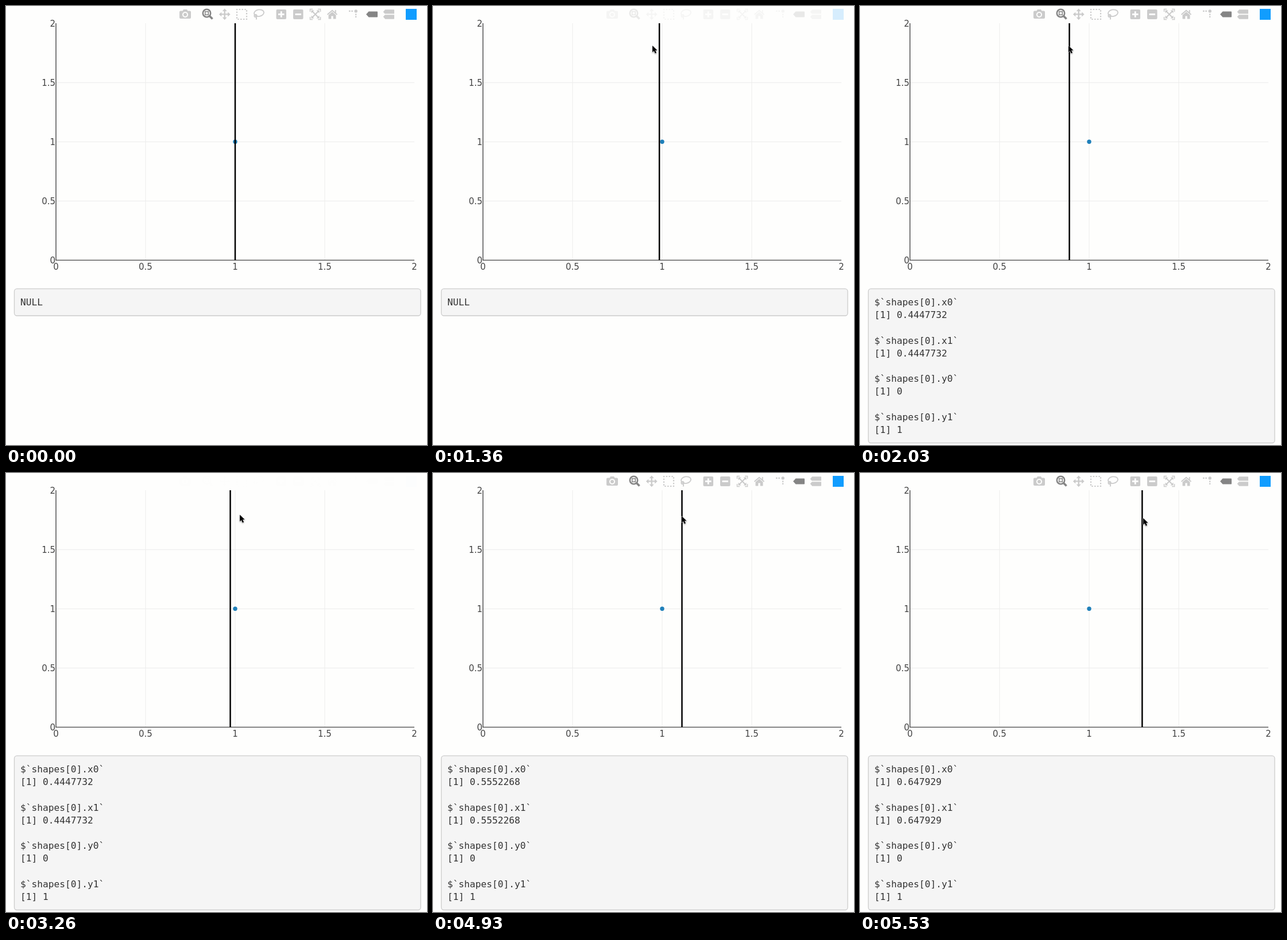
Animation of 733 by 764 pixels, one loop 5.56 s. Source, as an HTML page:

```html
<!DOCTYPE html>
<html lang="en">
<head>
<meta charset="utf-8">
<title>Draggable line</title>
<style>
html, body { margin: 0; width: 100%; height: 100%; overflow: hidden; background: #fefefd; }
svg { display: block; width: 733px; height: 764px; }
.tick { font: 15px "DejaVu Sans", Verdana, sans-serif; fill: #444; }
.out { font: 16.2px "DejaVu Sans Mono", Menlo, monospace; fill: #333; white-space: pre; }
#cursor { filter: drop-shadow(0 1.2px 1px rgba(0,0,0,.4)); }
</style>
</head>
<body>
<svg viewBox="0 0 733 764">
  <rect width="733" height="764" fill="#fefefd"/>
  <g id="grid" stroke="#eee" stroke-width="1.2"></g>
  <path d="M87 30V442.6" stroke="#444" stroke-width="1.4"/>
  <path d="M86.4 442.3H711" stroke="#444" stroke-width="1.2"/>
  <g id="ticks" class="tick"></g>
  <circle cx="399" cy="236.3" r="3.7" fill="#1f80ba"/>
  <path id="line" d="M0 30V442" stroke="#000" stroke-width="2.5"/>

  <g id="bar" fill="#cbcbcb" stroke="#cbcbcb" stroke-width="0">
    <!-- camera -->
    <path fill-rule="evenodd" d="M304 8.5h3.5l1.5-2.500h6l1.500 2.500h3.500q2 0 2 2v9.500q0 2-2 2h-16q-2 0-2-2v-9.500q0-2 2-2zM312 10a5 5 0 1 0 .01 0z"/>
    <circle cx="312" cy="15" r="3"/>
    <!-- zoom -->
    <g fill="none" stroke="#858585">
      <circle cx="349.500" cy="12.500" r="6.700" stroke-width="2.600"/>
      <rect x="346.700" y="9.700" width="5.600" height="5.600" stroke-width="1.500"/>
      <path d="M354.500 17.500l5 5" stroke-width="3.600"/>
    </g>
    <!-- pan -->
    <path d="M380.700 4.500l4 4.500h-2.800v4.200h4.200v-2.800l4.500 4-4.500 4v-2.800h-4.200v4.200h2.800l-4 4.500-4-4.500h2.800v-4.200h-4.200v2.800l-4.500-4 4.500-4v2.800h4.200v-4.200h-2.800z"/>
    <!-- box select -->
    <rect x="402" y="6" width="17" height="17" fill="none" stroke-width="2.200" stroke-dasharray="2.400 2.457" stroke-dashoffset="1.200"/>
    <!-- lasso -->
    <g fill="none" stroke-width="1.800">
      <ellipse cx="440.500" cy="12.200" rx="8.600" ry="5.800" transform="rotate(-10 440.500 12.200)"/>
      <circle cx="434.500" cy="17" r="2.200"/>
      <path d="M435 19q2 1.500.5 4.500"/>
    </g>
    <!-- zoom in, zoom out -->
    <rect x="470.500" y="6" width="17.500" height="17" rx="2"/>
    <rect x="500" y="6" width="17.500" height="17" rx="2"/>
    <path d="M474 14.500h10.500M479.250 9.250v10.500M503.500 14.500H514" stroke="#fefefd" stroke-width="2.800"/>
    <!-- autoscale -->
    <path d="M529.500 10V5.500h4.500M543 5.500h4.500V10M547.500 19v4.500H543M534 23.500h-4.500V19" fill="none" stroke-width="1.500"/>
    <path d="M533.500 9.500l10 10M543.500 9.500l-10 10" stroke-width="2"/>
    <path d="M531.500 7.500h5l-5 5zM545.500 7.500v5l-5-5zM531.500 21.500v-5l5 5zM545.500 21.500h-5l5-5z"/>
    <!-- home -->
    <path d="M568 10.200l6.500 5.600v6q0 .7-.7.7h-4.100v-5h-3.400v5h-4.100q-.7 0-.7-.7v-6z"/>
    <path d="M559.500 15l8.500-7.300 8.500 7.300M573.700 7v5" fill="none" stroke-width="1.900"/>
    <!-- spike lines -->
    <path d="M597 8.900h2.600M601.300 8.900h2.600M609.200 13.500v2.400M609.200 17.500v2.400" stroke-width="2.200"/>
    <circle cx="609.200" cy="8.900" r="2.700"/>
    <!-- hover modes -->
    <path fill="#858585" d="M627 14.400l4.500-5H646q1 0 1 1v8q0 1-1 1h-14.500z"/>
    <path d="M656.700 10.200l3.500-4H675q1 0 1 1v6q0 1-1 1h-14.800zM656.700 18.700l3.500-4H675q1 0 1 1v6q0 1-1 1h-14.800z"/>
    <path d="M659 14.400h18" stroke="#fefefd" stroke-width="1.800"/>
    <rect x="696" y="5" width="19" height="19" fill="#119dff"/>
  </g>

  <rect id="box" x="14.500" y="492.200" width="707.500" rx="4.500" fill="#f5f5f5" stroke="#ccc" stroke-width="1.300"/>
  <g id="out" class="out"></g>
  <path id="cursor" d="M0 0V11.500L2.700 9.100L4.700 13.600L6.900 12.600L5 8.300H8.500Z" fill="#000" stroke="#fff" stroke-width=".9" paint-order="stroke"/>
</svg>
<script>
const LOOP = 5560;
const $ = id => document.getElementById(id);
const clamp = v => Math.min(1, Math.max(0, v));
const progress = (t, from, to) => clamp((t - from) / (to - from));
const smooth = p => p * p * (3 - 2 * p);
const mix = (a, b, p) => a + (b - a) * p;
const plotX = fraction => 87 + 624 * fraction;

// CSS "ease": cubic-bezier(.25, .1, .25, 1)
function ease(x) {
  const bezier = (a, b, s) => 3 * a * s * (1 - s) ** 2 + 3 * b * s * s * (1 - s) + s ** 3;
  let lo = 0, hi = 1;
  for (let i = 0; i < 18; i++) {
    const mid = (lo + hi) / 2;
    if (bezier(.25, .25, mid) < x) lo = mid; else hi = mid;
  }
  return bezier(.1, 1, lo);
}

const text = (x, y, s, anchor = "start") =>
  `<text x="${x}" y="${y}" text-anchor="${anchor}">${s}</text>`;

let grid = "", ticks = "";
for (let i = 0; i <= 4; i++) {
  const x = 87 + 156 * i, y = 442.3 - 103 * i;
  if (i > 0 && i < 4) grid += `<path d="M${x} 30V442M87 ${y}H711"/>`;
  ticks += text(x, 458.6, i / 2, "middle") + text(86, y + 5.2, i / 2, "end");
}
$("grid").innerHTML = grid;
$("ticks").innerHTML = ticks;

// Toolbar fades: start time and direction
const fades = [[60, 1], [1200, 0], [1760, 1], [2990, 0], [3588, 1], [4930, 0], [5240, 1]];

// Line drags; the line trails the pointer
const LAG = 70;
const drags = [
  { from: 1220, to: 1520, x0: .5, x1: .4447732 },
  { from: 3020, to: 3430, x0: .4447732, x1: .5552268 },
  { from: 4940, to: 5210, x0: .5552268, x1: .647929 }
];

// Pointer legs: start, end, x0, y0, x1, y1
const legs = [
  [60, 600, 432, -16, 405, 63],
  [630, 720, 405, 63, 403, 67],
  [800, 1100, 403, 67, 398, 69],
  [1220, 1520, 398, 69, 363, 69],
  [3020, 3430, 363, 69, 433, 75],
  [4940, 5210, 433, 75, 493, 78.5]
];

const readings = [[1760, "0.4447732"], [3560, "0.5552268"], [5235, "0.647929"]];

function toolbarOpacity(t) {
  const [start, shown] = fades.findLast(f => t >= f[0]) || [0, 0];
  const p = ease(progress(t, start, start + 300));
  return shown ? p : 1 - p;
}

function lineX(t) {
  const d = drags.findLast(d => t >= d.from) || drags[0];
  return plotX(mix(d.x0, d.x1, smooth(progress(t - LAG, d.from, d.to))));
}

function pointer(t) {
  const [from, to, x0, y0, x1, y1] = legs.findLast(l => t >= l[0]) || legs[0];
  const p = smooth(progress(t, from, to));
  return [mix(x0, x1, p), mix(y0, y1, p)];
}

let shownValue;
function showOutput(value) {
  if (value === shownValue) return;
  shownValue = value;
  const lines = value
    ? [["x0", value], ["x1", value], ["y0", 0], ["y1", 1]]
        .flatMap(([key, v]) => ["$`shapes[0]." + key + "`", "[1] " + v, ""])
    : ["NULL"];
  $("out").innerHTML = lines.map((s, i) => text(25, 521.3 + 22.15 * i, s)).join("");
  $("box").setAttribute("height", value ? 268.3 : 46.8);
}

function draw(t) {
  const [x, y] = pointer(t);
  $("bar").setAttribute("opacity", toolbarOpacity(t));
  $("line").setAttribute("transform", `translate(${lineX(t)} 0)`);
  $("cursor").setAttribute("transform", `translate(${x} ${y})`);
  $("cursor").setAttribute("visibility", t < 60 ? "hidden" : "visible");
  showOutput((readings.findLast(r => t >= r[0]) || [0, ""])[1]);
}

const began = performance.now();
function tick() {
  draw((performance.now() - began) % LOOP);
  requestAnimationFrame(tick);
}
tick();
</script>
</body>
</html>
```
